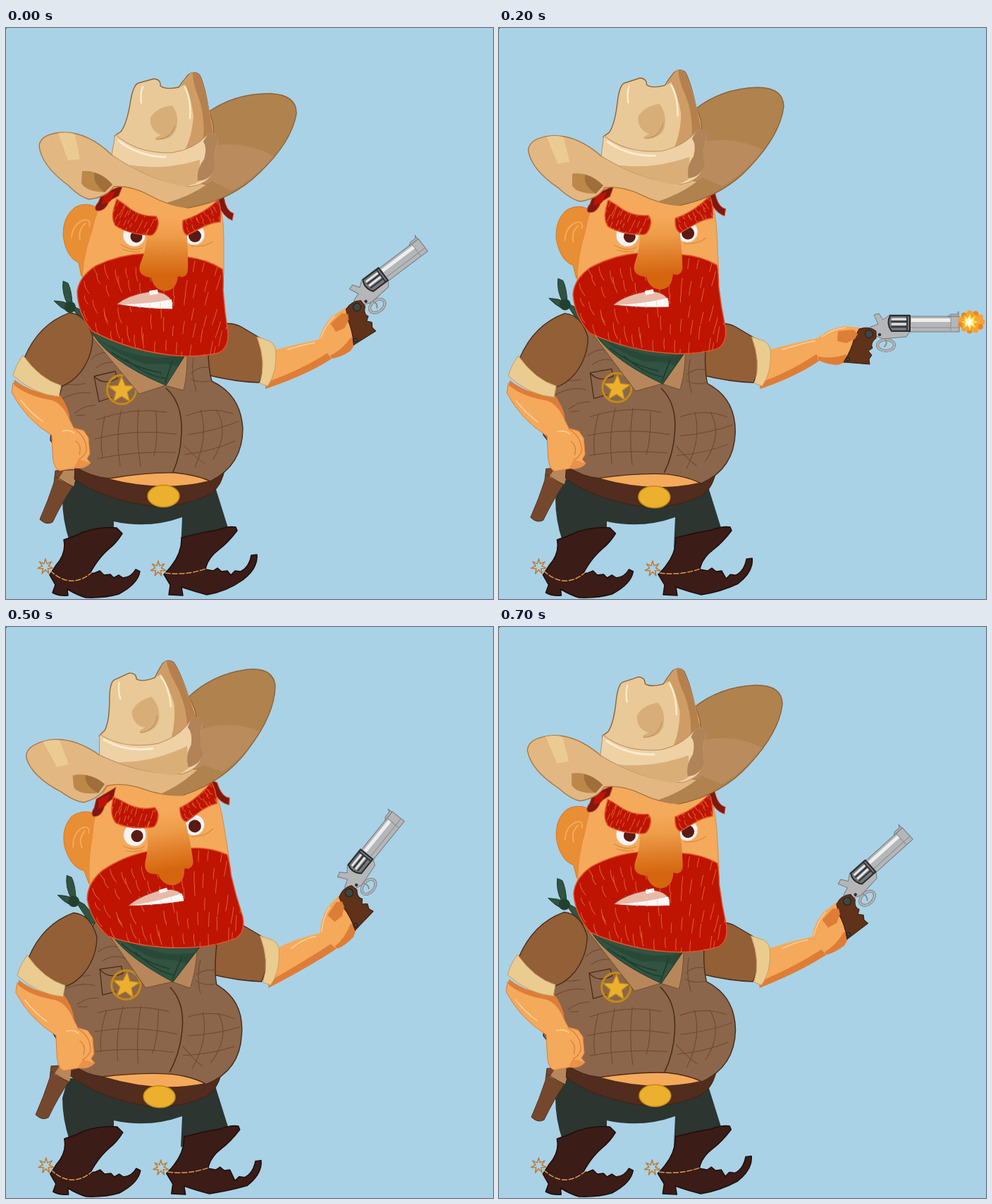
These frames come from a looping animation (691 px wide and 810 px high, 800 ms). An HTML page:

```html
<!DOCTYPE html>
<html lang="en">
<head>
<meta charset="utf-8">
<title>Sheriff</title>
<style>
html, body { margin: 0; width: 100%; height: 100%; overflow: hidden; background: #a9d2e7; }
svg { display: block; width: 100%; height: 100%; }
</style>
</head>
<body>
<svg id="stage" viewBox="0 0 691 810"></svg>
<script>
const STEP = 100;
// One entry per pose: lean of head and body, hat and brow lift, gun angle and pivot.
const poses = [
  { head: 0,   body: 0,   hat: 0,  brow: 0,  gun: [-37, 498, 396] },
  { head: .12, body: .2,  hat: 0,  brow: 0,  gun: [-18, 514, 414] },
  { head: .22, body: .4,  hat: 0,  brow: 0,  gun: [0, 525, 434], blast: 1 },
  { head: .62, body: .64, hat: 21, brow: 3,  gun: [0, 524, 435], blast: 2 },
  { head: 1,   body: 1,   hat: 23, brow: 12, gun: [-31, 506, 394] },
  { head: .75, body: .74, hat: 6,  brow: 7,  gun: [-51, 487, 377] },
  { head: .5,  body: .5,  hat: 2,  brow: 3,  gun: [-46, 491, 383] },
  { head: .27, body: .26, hat: 0,  brow: 0,  gun: [-42, 494, 389] }
];
const C = {
  skin: '#f5a95a', shade: '#de7d38', red: '#bf1400', rim: '#e0562a', hair: '#7e1810',
  sleeve: '#925f36', cuff: '#eacb90', vest: '#8b664a', seam: '#6c4731', line: '#4a2a18',
  green: '#315340', dark: '#1f3b2f', collar: '#b7875b', gold: '#ebb02d', brass: '#c38a18',
  belt: '#522c1c', boot: '#3b1c16', steel: '#b5b6b8', hatLine: '#8f6335'
};

let seed = 7;
const rnd = () => (seed = (seed * 16807) % 2147483647) / 2147483647;
const P = (d, fill = 'none', stroke = 'none', w = 1, more = '') =>
  `<path d="${d}" fill="${fill}" stroke="${stroke}" stroke-width="${w}" stroke-linejoin="round" ${more}/>`;
const L = (d, stroke, w = 1, more = '') => P(d, 'none', stroke, w, 'stroke-linecap="round" ' + more);
const O = (x, y, r, fill, stroke = 'none', w = 1, ry = r) =>
  `<ellipse cx="${x}" cy="${y}" rx="${r}" ry="${ry}" fill="${fill}" stroke="${stroke}" stroke-width="${w}"/>`;
const G = (id, ...parts) => `<g id="${id}">${parts.join('')}</g>`;

function star(x, y, n, outer, inner, turn = -90) {
  let d = '';
  for (let i = 0; i < n * 2; i++) {
    const a = (turn + i * 180 / n) * Math.PI / 180, r = i % 2 ? inner : outer;
    d += (i ? 'L' : 'M') + (x + r * Math.cos(a)).toFixed(1) + ',' + (y + r * Math.sin(a)).toFixed(1);
  }
  return d + 'Z';
}

// Short hairs scattered on a loose grid inside a clip shape.
function strands(clip, [x0, y0, x1, y1], dx, dy, len, lean) {
  let d = '';
  for (let y = y0; y < y1; y += dy)
    for (let x = x0 + rnd() * dx; x < x1; x += dx) {
      const l = len * (.55 + .6 * rnd()), s = lean(x, y) * l;
      d += `M${(x + rnd() * 5).toFixed(1)},${(y + rnd() * dy).toFixed(1)}q${(s * .2 - 1.5).toFixed(1)},${(l / 2).toFixed(1)} ${s.toFixed(1)},${l.toFixed(1)}`;
    }
  return `<g clip-path="url(#${clip})">${L(d, '#dc6428')}</g>`;
}

const beard = 'M101,374 Q104,352 128,337 Q162,321 197,320 L258,325 Q285,328 307,342 Q309,352 308,372 Q310,402 315,432 Q316,455 301,461 Q275,467 245,465 Q180,460 122,430 Q102,405 101,374Z';
const browL = 'M157,243 Q163,246 177,257 Q193,268 213,267 Q218,274 215,283 Q210,296 203,294 Q172,292 155,280 Q149,270 153,256Z';
const browR = 'M301,244 Q306,254 304,275 Q290,276 274,285 L257,294 Q249,290 251,273 Q278,265 301,244Z';

const defs = `<defs>
<linearGradient id="noseTone" gradientUnits="userSpaceOnUse" x1="0" y1="270" x2="0" y2="372">
<stop offset="0" stop-color="${C.skin}"/><stop offset=".25" stop-color="#ee9c48"/>
<stop offset=".55" stop-color="#df7d28"/><stop offset=".8" stop-color="#d5650f"/></linearGradient>
<clipPath id="inBeard"><path d="${beard}"/></clipPath>
<clipPath id="inBrowL"><path d="${browL}"/></clipPath>
<clipPath id="inBrowR"><path d="${browR}"/></clipPath></defs>`;

const pants = P('M88,640 L80,668 Q80,698 90,728 L153,718 V700 Q203,711 250,694 L248,738 L316,712 L295,645Z', '#2c3530');

const spur = (x, y) => P(star(x, y, 7, 11, 4.5), 'none', '#c07a35', 1.5);
const stitch = d => L(d, '#dd9a4c', 1.5, 'stroke-dasharray="7 3"');
const bootL = P('M82,726 Q96,722 110,715 Q135,707 157,709 L165,717 Q157,730 146,739 Q130,753 119,774 L126,773 L133,770 L139,776 L148,775 L153,780 L160,776 L166,780 Q178,779 184,768 L190,771 Q187,789 160,803 Q140,809 113,808 Q100,804 87,796 L88,805 Q74,806 66,801 L70,790 L62,776 L71,762 Q86,745 82,726Z', C.boot, '#1f0d0a', 1.5)
  + stitch('M63,770 Q92,797 121,773') + spur(56, 764);

function bootR(k) {
  const q = (x, y) => `${x + 3 * k},${y + 13 * k}`;
  return P(`M249,723 Q275,716 300,712 Q316,706 326,708 L328,713 Q315,730 302,740 Q286,752 283,768 L294,770 L300,766 L306,771 L314,770 L${q(319, 776)} L${q(325, 770)} L${q(333, 771)} Q${q(345, 765)} ${q(348, 748)} L${q(356, 747)} Q${q(358, 766)} ${q(336, 783)} Q312,800 285,804 Q265,799 249,793 L251,805 L231,804 L233,790 L224,775 Q250,750 249,723Z`, C.boot, '#1f0d0a', 1.5)
    + stitch('M226,773 Q255,777 284,767') + spur(216, 767);
}

const holster = P('M70,628 L102,626 L95,650 Q80,672 66,701 Q57,706 48,697 Q60,670 68,645Z', '#75482e', '#54301d')
  + P('M82,628 L102,627 L96,650 L74,640Z', C.collar) + L('M70,636 L95,651', '#54301d');

const belt = P('M98,622 Q150,645 215,648 Q275,648 311,622 Q307,650 290,661 Q250,681 208,678 Q140,670 97,640Z', C.belt, '#3f2114')
  + P('M145,639 V622 H289 V642 Q222,659 145,639Z', C.skin)
  + O(223.5, 664, 22.5, C.gold, C.brass, 1.5, 15.5);

// The hem at the left hangs down while the chest leans.
const vest = k => P(`M116,420 Q92,470 76,520 Q64,555 63,585 L98,${622 + 14 * k} Q120,${637 + 12 * k} ${147 - 6 * k},${639 + 9 * k} Q200,${630 + 5 * k} 240,${631 + 3 * k} Q270,634 290,643 Q336,620 ${336 - 3 * k},568 Q333,520 292,501 Q286,480 287,445 Z`, C.vest, C.line, 1.4);
const trim = L('M227,511 Q251,532 249,575 Q248,605 237,630', C.line, 1.5)
  + L('M128,556 Q180,537 228,545 M126,583 Q180,568 242,576 M130,611 Q180,600 240,602 M163,543 Q155,582 162,621 M188,541 Q184,580 191,622 M213,544 Q216,585 210,606 M140,551 Q132,585 137,610', C.seam)
  + L('M256,550 Q290,536 322,547 M258,577 Q298,571 330,558 M254,605 Q290,601 325,586 M276,542 Q288,580 268,623 M298,541 Q318,572 294,612 M252,592 Q270,610 282,618', C.seam)
  + L('M76,528 Q100,514 120,518 M97,547 Q110,535 127,535 M100,550 L112,549 M84,505 Q100,508 112,504 M120,470 Q137,455 152,463 M128,482 Q142,470 160,476 M262,490 Q275,478 290,482 M262,498 Q276,505 290,500 M266,468 Q262,490 270,515', C.seam)
  + L('M125,494 L155,487 L158,497 Q138,508 125,494 L132,530 L150,524', C.line, 1.3)
  + O(164, 513, 20.5, 'none', C.brass, 3) + P(star(164, 514, 5, 19.5, 8.5), C.gold, C.brass, 1.3);

const neck = P('M120,436 L189,519 L226,507 L165,440Z', C.collar, '#75502f')
  + P('M226,507 L252,514 Q258,490 257,455 L235,465Z', C.collar, '#75502f')
  + P('M118,424 Q138,470 227,507 L260,455 L150,430Z', C.green, C.dark)
  + P('M128,440 Q160,462 215,468 Q245,467 256,462 L244,480 Q224,474 200,477 Q160,465 128,440Z', C.dark, 'none', 1, 'opacity=".45"')
  + L('M150,460 Q180,482 220,489 M170,470 Q200,494 226,497 M236,472 L226,503', C.dark, 1.6);

const knot = P('M91,392 L106,400 L132,430 L114,427Z', C.green, C.dark)
  + P('M81,359 L88,362 Q93,372 94,391 L87,391 Q79,376 81,359Z M68,387 Q80,387 92,392 L88,402 Q77,397 68,387Z', C.green, C.dark)
  + O(91, 396, 8, '#23402f');

const armL = P('M10,503 Q40,525 74,521 Q86,538 89,553 L96,567 L110,571 L117,581 L119,604 L115,611 L120,617 Q112,626 98,624 L76,628 Q66,625 66,600 L65,578 Q28,555 8,517Z', C.skin, C.shade)
  + P('M12,499 Q40,521 75,519 Q89,536 91,556 L82,541 Q72,528 60,527 Q28,521 11,506Z', C.shade)
  + P('M103,612 L120,617 Q112,626 96,624Z', '#e8924a')
  + L('M96,568 Q115,580 114,600 Q110,609 103,612 M99,586 Q108,592 104,605', C.shade, 1.3)
  + L('M21,528 Q35,546 52,558 M80,572 Q90,569 97,575', '#fbd09c', 1.5)
  + P('M90,404 Q114,406 123,438 Q123,465 106,488 Q92,505 76,509 Q46,499 26,468 Q46,420 90,404Z', C.sleeve, C.line, 1.3)
  + P('M24,464 Q48,498 78,507 L75,523 Q40,520 10,493 Q13,480 24,464Z', C.cuff, '#c79d60');

const sleeveR = P('M290,425 Q316,414 334,424 L361,440 Q372,475 359,503 Q325,502 285,492Z', C.sleeve, C.line, 1.3);
const cuffR = P('M356,438 L374,444 Q384,450 383,463 Q384,490 371,508 L360,504 Q370,475 356,438Z', C.cuff, '#c79d60');

const gun = P('M452,440 Q468,426 490,423 L512,425 Q524,428 518,437 L505,450 L498,472 L480,478 Q464,477 452,470Z', C.skin)
  + P('M453,466 Q472,470 492,463 L498,472 L480,478 Q464,477 453,471Z', C.shade)
  + L('M458,438 Q474,427 492,425', '#fbd09c', 1.4)
  + P('M583,409 H653 V431 H583Z', C.steel, '#77797c')
  + P('M585,412 H641 V417 H585Z', '#eeeeef') + L('M584,425 H652 M641,410 V430', '#8b8d90')
  + P('M637,409 L641,406 L650,406 L652,402 V409Z', C.steel, '#77797c')
  + P('M532,407 L539,405 L545,414 L554,407 H583 V431 L578,438 L545,441 L528,434 L527,424 L538,420Z', C.steel, '#77797c')
  + P('M555,408 H583 V430 H557 Q549,419 555,408Z', '#74777a', '#282a2c', 2)
  + L('M558,413 H577 M558,420 H577', '#e6e6e8', 3) + L('M557,416.5 H578 M557,424 H578 M579,409 V429', '#2f3133', 1.8)
  + O(549, 450, 12, 'none', '#77797c', 4, 8) + O(549, 450, 12, 'none', C.steel, 2.4, 8)
  + L('M548,441 Q552,447 547,452', '#8b8d90', 2) + O(540, 435, 2.2, '#303234')
  + P('M511,427 Q525,422 535,430 L535,440 Q526,447 530,454 L524,458 L529,464 L525,470 L526,477 L489,474 Q500,457 504,440Z', '#5f3219', '#36190b')
  + O(525, 434, 5.5, '#3c4844', '#201d1a') + O(495, 470, 2.5, '#3c4844', '#201d1a')
  + P('M481,430 L503,428 L509,434 L505,441 L493,447 L480,444Z', C.shade);

function blast(kind) {
  let s = '';
  const full = kind === 1, n = full ? 11 : 17;
  for (let i = 0; i < n; i++) {
    const a = i * 2 * Math.PI / n, r = full ? 14 : 13 + 2 * Math.sin(i * 5);
    const x = 670 + r * 1.1 * Math.cos(a), y = 417 + r * .9 * Math.sin(a);
    s += O(x.toFixed(1), y.toFixed(1), full ? 4 : 1.5 + i % 3 * .7, i % 2 ? '#f08519' : '#f5a135');
  }
  if (full) s += O(669, 417, 12.5, '#f9a52d') + P(star(668, 417, 8, 12, 6), '#ffe04f') + P(star(667, 417, 6, 8, 4), '#fffbe0');
  return s;
}

const mouth = P('M157,392 Q172,379 203,374 Q229,372 237,390 L236,399 Q200,399 157,392Z', '#e9b9a8', '#b5321a')
  + P('M164,392 Q200,392 235,385 L236,398 Q200,398 164,392Z', '#fbf9f7')
  + P('M203,373 L215,371 L216,377 L204,379Z', '#fbf9f7') + L('M190,392 V397 M204,391 V398 M219,389 V398', '#e3d3cd', .8);

const face = P('M133,257 Q116,245 98,254 Q80,268 81,295 Q85,325 103,333 L107,352 L125,300Z', '#e88e35', '#d67b28')
  + L('M93,297 Q95,277 112,272 Q121,272 118,281 M105,300 Q102,286 113,277', C.skin, 2)
  + P('M108,372 Q106,332 122,287 Q134,235 160,215 Q185,190 230,190 Q285,194 300,235 Q309,265 309,300 L309,350 L230,400Z', C.skin, '#e08a3c')
  + P('M136,235 L166,223 L160,238 L147,245 Q140,262 128,259 Q124,255 131,247Z', C.hair, C.rim)
  + P('M139,236 L156,231 L148,246 L136,250Z', C.red)
  + P('M298,232 L309,239 Q312,260 323,263 L321,273 Q308,268 301,250Z', C.hair, C.rim)
  + L('M163,307 Q180,318 193,312 M166,314 Q178,319 190,317 M262,309 Q280,312 293,303', '#d98a3d', 1.2)
  + O(182, 294, 16, '#f7f3f1', '#e9bc98') + O(185, 296, 8.5, '#5a1b14')
  + O(267, 293, 15, '#f7f3f1', '#e9bc98') + O(268, 295, 9, '#5a1b14')
  + P(beard, C.red, C.rim, 1.5) + strands('inBeard', [104, 322, 318, 462], 16, 26, 20, (x, y) => (x - 215) / 420 * (y > 400 ? -1 : -1.6))
  + G('mouth', mouth)
  + P('M201,268 Q202,308 191,333 Q184,352 206,354 Q210,372 226,373 Q242,372 244,352 Q257,356 258,343 Q259,310 254,268Z', 'url(#noseTone)');

const brows = G('browL', P(browL, C.red, C.rim, 1.5), strands('inBrowL', [150, 240, 218, 296], 8, 9, 8, () => -.5))
  + G('browR', P(browR, C.red, C.rim, 1.5), strands('inBrowR', [248, 242, 306, 296], 8, 9, 8, () => .5));

const hat = P('M286,120 Q325,92 376,93 Q413,95 412,122 Q405,162 360,205 Q320,245 258,255 L200,235Z', '#b0824e', C.hatLine, 1.4)
  + P('M292,167 Q340,159 380,182 Q345,225 292,242 L270,215Z', '#ba8b5c')
  + P('M47,167 Q49,150 80,148 Q116,147 150,180 Q190,205 285,222 Q278,238 258,255 Q230,252 205,238 Q178,223 153,225 Q143,240 118,243 Q105,240 88,223 Q50,195 47,167Z', '#e2b782', '#a87844', 1.4)
  + P('M292,217 Q264,238 228,248 Q245,255 260,254 Q294,249 322,232Z', '#b0824e')
  + P('M74,149 Q90,147 98,151 L105,186 L88,188Z', '#ebcb92')
  + P('M108,203 Q132,201 151,222 L140,233 Q113,232 107,220Z', '#bb8848') + P('M126,205 Q141,210 151,222 L140,233 Q122,220 126,205Z', '#a06e3a')
  + P('M163,147 Q172,135 177,102 Q181,80 188,78 L210,72 Q220,73 219,82 Q226,88 245,84 Q251,75 259,66 Q268,60 275,67 Q282,82 288,118 Q296,138 294,152 L250,186 Q180,190 154,153Z', '#e8c997', C.hatLine, 1.4)
  + P('M247,84 Q253,73 262,64 Q270,62 275,68 Q287,100 294,150 L250,180 Q264,158 266,125 Q262,95 254,80Z', '#cf9c66')
  + P('M265,64 Q272,63 276,70 Q287,105 294,150 L279,165 Q284,130 273,98 Q265,78 265,64Z', '#b5804e')
  + P('M205,127 Q214,112 236,110 Q247,125 241,145 Q234,160 213,158 Q208,156 220,152 Q203,145 205,127Z', '#d8ae78')
  + L('M240,138 Q234,158 213,158', '#c18e58', 1.2) + L('M194,83 Q190,94 192,106 M254,84 Q263,102 261,128', '#faeacb', 2.5)
  + P('M155,151 Q185,178 235,177 Q268,172 286,151 Q302,145 302,158 Q293,180 296,200 Q288,222 262,225 Q205,218 150,180Z', '#efd1a6', '#b98c58')
  + P('M174,194 Q222,203 275,187 L274,217 Q262,226 246,224 Q205,213 174,194Z', '#d9ae77')
  + L('M160,160 Q188,182 226,183', '#fbebcf', 3)
  + P('M286,151 Q303,145 302,157 Q292,180 296,200 Q290,216 272,217 Q270,200 281,186 Q286,170 280,161Z', '#b08358');

const stage = document.getElementById('stage');
stage.innerHTML = defs + '<rect width="691" height="810" fill="#a9d2e7"/><rect width="1" height="1" fill="#222"/>'
  + pants + G('bootL', bootL) + G('bootR') + G('sleeveR', sleeveR) + G('forearm') + G('gun', gun, G('blast')) + G('cuffR', cuffR)
  + G('knot', knot) + G('holster', holster) + G('belt', belt) + G('body', G('vest'), trim, G('neck', neck)) + G('armL', armL)
  + G('head', face, brows, G('hat', hat));

const el = id => document.getElementById(id);
const place = (id, value) => el(id).setAttribute('transform', value);
const shift = (id, x, y) => place(id, `translate(${x} ${y})`);

function forearm(k, [angle, px, py]) {
  const a = angle * Math.PI / 180;
  const at = (x, y) => [px + (x - 525) * Math.cos(a) - (y - 434) * Math.sin(a), py + (x - 525) * Math.sin(a) + (y - 434) * Math.cos(a)];
  const [tx, ty] = at(456, 439), [bx, by] = at(456, 471), x = 6 * k;
  const low = `Q${bx - 35},${by + 24} ${368 + x},512`;
  return P(`M${376 + x},458 Q${tx - 38},${ty + 8} ${tx},${ty} L${tx + 12},${ty + 10} L${bx + 6},${by} L${bx},${by} ${low}Z`, C.skin)
    + P(`M${bx + 4},${by} L${bx},${by} ${low} L${368 + x},503 Q${bx - 45},${by + 18} ${bx - 6},${by - 8}Z`, C.shade)
    + L(`M${400 + x},456 Q${tx - 25},${ty + 8} ${tx - 8},${ty + 5}`, '#fbd09c', 1.5);
}

let shown = -1;
function draw(time) {
  const i = Math.floor(time / STEP) % poses.length;
  if (i === shown) return;
  shown = i;
  const p = poses[i], k = p.body, h = p.head, [angle, px, py] = p.gun;
  place('body', `rotate(${7 * k} 225 580)`);
  el('vest').innerHTML = vest(k);
  place('belt', `translate(${-8 * k} ${3 * k}) rotate(${3 * k} 223 664)`);
  shift('holster', -8 * k, -7 * k);
  shift('neck', 4 * k, -6 * k);
  shift('knot', 7 * k, -9 * k);
  shift('armL', 8 * k, 2 * k);
  shift('sleeveR', 5 * k, 0);
  shift('cuffR', 6 * k, 0);
  shift('bootL', k, 0);
  shift('bootR', 5 * k, 0);
  el('bootR').innerHTML = bootR(k);
  el('forearm').innerHTML = forearm(k, p.gun);
  place('gun', `translate(${px} ${py}) rotate(${angle}) translate(-525 -434)`);
  el('blast').innerHTML = p.blast ? blast(p.blast) : '';
  place('head', `translate(${21 * h} ${-3.5 * h}) rotate(${-12 * h} 197.5 391)`);
  place('mouth', `translate(0 392) scale(1 ${1 - .25 * h}) translate(0 -392)`);
  shift('browL', .45 * p.brow, -p.brow);
  shift('browR', 0, -p.brow);
  shift('hat', 0, -p.hat);
}
function tick() {
  draw(performance.now());
  requestAnimationFrame(tick);
}
tick();
</script>
</body>
</html>
```
